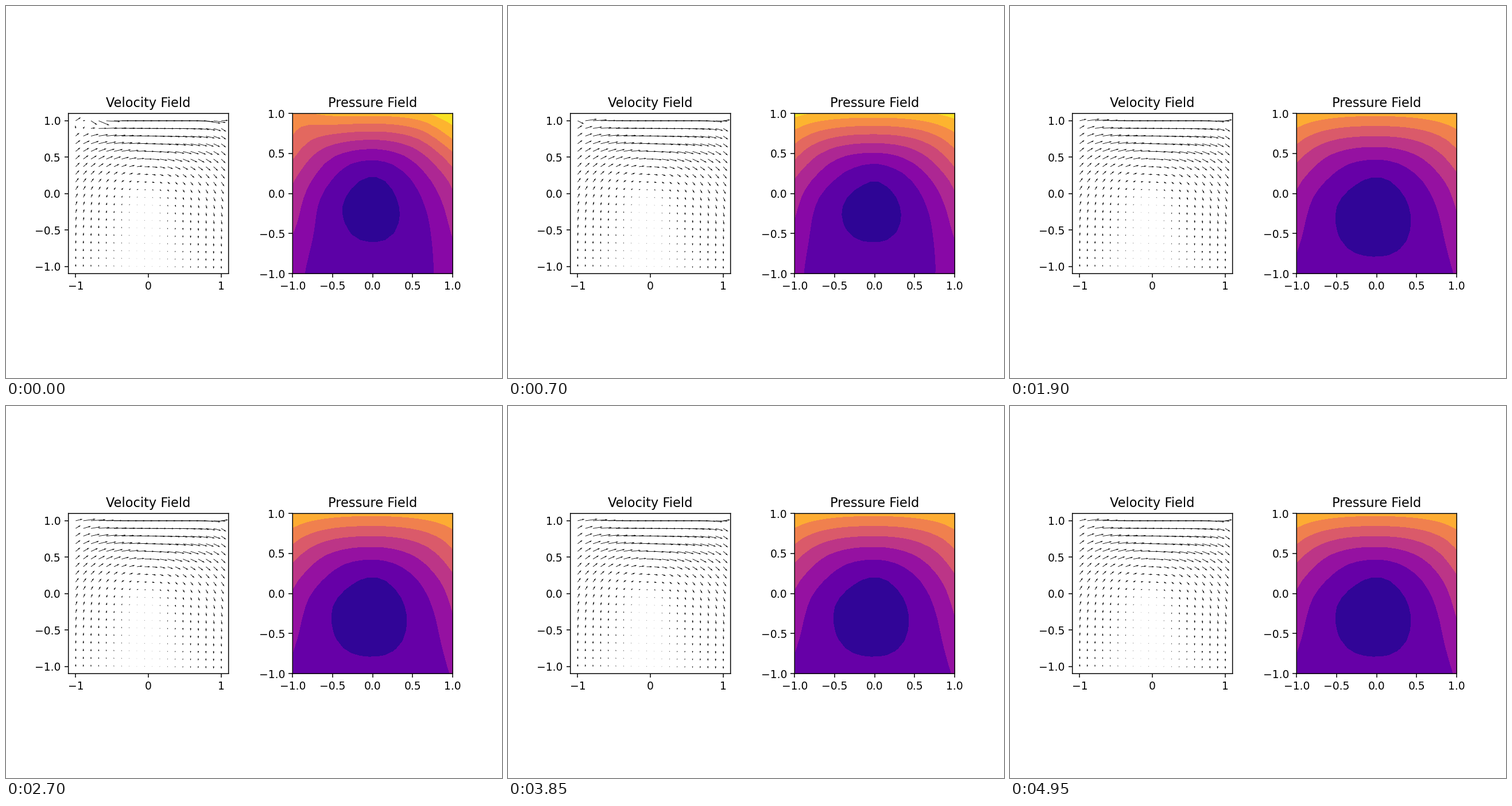
Animation, 864 px wide and 648 px high, one loop 5000 ms. Source, as a matplotlib script:

```python
import numpy as np
import matplotlib.pyplot as plt
from matplotlib.animation import FuncAnimation

N = 20
FRAMES = 100
AXES_PX = 279
LEVEL_SWITCH = 17  # the colour step widens from here on

axis = np.linspace(-1, 1, N)
X, Y = np.meshgrid(axis, axis)
SIDE = np.abs(X)


def bump(x0, y0, wx, wy):
    return np.exp(-((X - x0) / wx) ** 2 - ((Y - y0) / wy) ** 2)


def sigmoid(z):
    return 1 / (1 + np.exp(-z))


def softplus(z):
    return np.log1p(np.exp(z))


def wall(height, above, below, sharp, width):
    """Rise of the pressure from the middle towards one side wall."""
    d = Y - .2
    bell = height * np.exp(-(d / np.where(d > 0, above, below)) ** 2)
    power = 1.6 + sharp * (1 - np.exp(-(d / width) ** 2))
    return bell * SIDE ** power


MIDDLE = 1.7 * softplus((Y - .27) / .2) + .05 * softplus((.2 - Y) / .05)
SETTLED = MIDDLE + np.where(X < 0, wall(2.4, .74, 1.03, .85, .3),
                            wall(2.85, .69, 1.1, .7, .45))
STARTUP = (.32 * bump(-1, -.25, .5, .55) - 1.1 * bump(-1, 1, .4, .3)
           + .5 * bump(1, .8, .3, .3) - .33 * bump(0, .6, .7, .5))
DRIFT = .1 * bump(1, -.1, .2, .6)


def pressure(i):
    return SETTLED + np.exp(-i / 5) * STARTUP + (i - 54) / 45 * DRIFT


def velocity(i):
    """Arrow components in pixels."""
    fade = np.exp(-i / 5)

    core = 30 * sigmoid((Y - .5) / .22) - .8
    edge = 9 * sigmoid((Y - .05) / .25)
    u = edge + (core - edge) * (1 - SIDE ** (2.2 + .8 * Y))

    steep = 1.2 + .7 * np.tanh(3 * Y)
    swirl = np.tanh(steep * (X + .05)) / np.tanh(steep)
    lid = np.exp(-((1 - Y) / .38) ** 2)
    floor = 1 - .4 * np.exp(-((Y + 1) / .4) ** 2)
    v = -7.5 * swirl * floor * (1 - lid * (1 - .7 * SIDE ** 3))

    # Moving lid
    u[-1] = 28 - 16 * np.abs(axis) ** 8
    v[-1] = (3.2 * np.exp(-((axis + .95) / .25) ** 2)
             - 2 * np.exp(-((axis - .8) / .12) ** 2)
             + 2 * np.exp(-((axis - 1) / .1) ** 2))

    # Corner disturbance that dies out
    u -= 18 * fade * bump(-.9, 1, .25, .15)
    v -= fade * (11 * bump(-.74, 1, .12, .08) + 3 * bump(.85, 1, .15, .08))
    keys = [0, 14, 20, 38]
    u[-1, 0] = np.interp(i, keys, [9, 11, 17, 12])
    v[-1, 0] = np.interp(i, keys, [6, -5.5, 0, 3])
    return u, v


plt.rcParams["path.snap"] = False
fig, (ax_v, ax_p) = plt.subplots(1, 2, figsize=(6.4, 4.8), dpi=135)
fig.subplots_adjust(left=.1258, right=.9007, bottom=.1108, top=.8808,
                    wspace=.4)
half_ticks = np.linspace(-1, 1, 5)

ax_v.set_title("Velocity Field")
ax_v.set(xlim=(-1.1, 1.1), ylim=(-1.1, 1.1), aspect="equal",
         xticks=[-1, 0, 1], yticks=half_ticks)
arrows = ax_v.quiver(X, Y, *velocity(0), scale=AXES_PX)

ax_p.set_title("Pressure Field")
ax_p.set(xlim=(-1, 1), ylim=(-1, 1), aspect="equal",
         xticks=half_ticks, yticks=half_ticks)
filled = None


def update(i):
    global filled
    arrows.set_UVC(*velocity(i))
    if filled is not None:
        filled.remove()
    levels = np.arange(10) * 5 / 6 if i < LEVEL_SWITCH else np.arange(9)
    filled = ax_p.contourf(X, Y, pressure(i), levels=levels, cmap="plasma")
    return arrows,


anim = FuncAnimation(fig, update, frames=FRAMES, interval=50, repeat=True,
                     init_func=lambda: update(0), blit=False)
plt.show()
```
